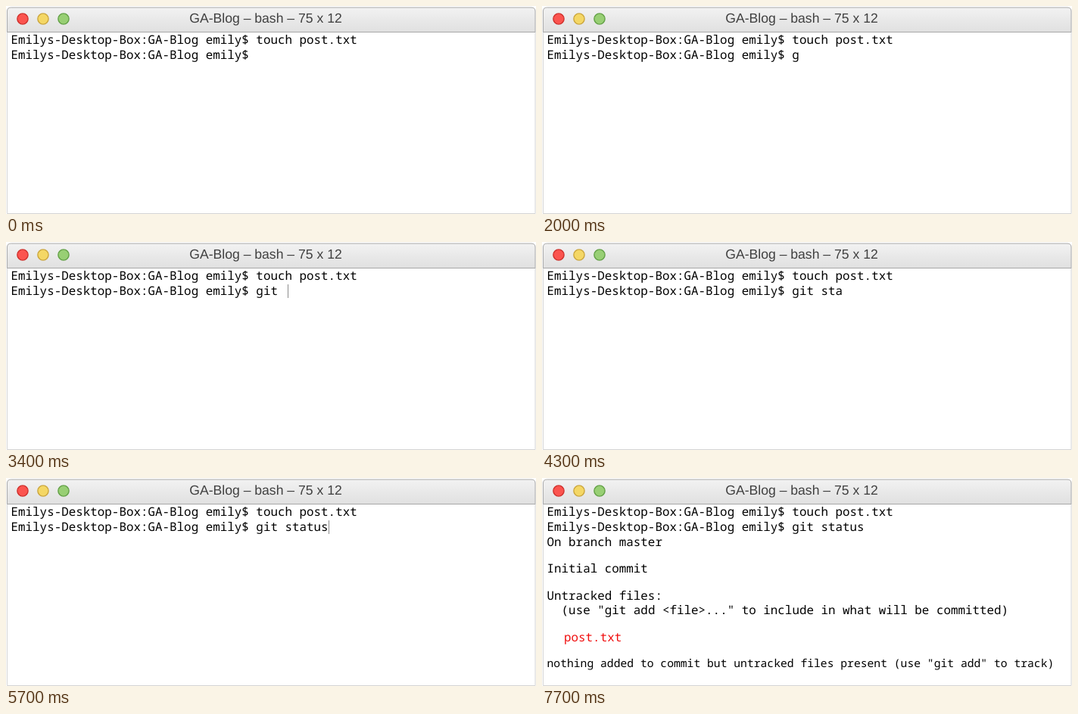
Write an HTML page that moves like this. It is 700 px wide and 275 px high and loops after 8 s.

```html
<!DOCTYPE html>
<html lang="en">
<head>
<meta charset="utf-8">
<title>Terminal</title>
<style>
  html, body { margin: 0; width: 100%; height: 100%; overflow: hidden; background: #fff; }
  svg { display: block; }
  text { white-space: pre; text-rendering: geometricPrecision; }
  .title { font: 17.6px "Liberation Sans", Arial, sans-serif; fill: #404040; text-anchor: middle; }
  .term { font: 15.88px "Noto Sans Mono", monospace; fill: #000; }
  .term .small { font-size: 14.7px; }
  .term .red { fill: #f00f0f; }

  .cover, .cursor, .output { animation: 8s step-end infinite; }
  .cover { animation-name: type; --ch: 9.528px; }
  .cursor { animation-name: blink; }
  .output { animation-name: show; }

  /* the cover slides right one character per key press */
  @keyframes type {
    0% { transform: none; }
    25% { transform: translateX(var(--ch)); }
    27.5% { transform: translateX(calc(2 * var(--ch))); }
    30% { transform: translateX(calc(3 * var(--ch))); }
    48.75% { transform: translateX(calc(5 * var(--ch))); }
    51.25% { transform: translateX(calc(6 * var(--ch))); }
    53.75% { transform: translateX(calc(7 * var(--ch))); }
    56.25% { transform: translateX(calc(8 * var(--ch))); }
    58.75% { transform: translateX(calc(9 * var(--ch))); }
    65%, 100% { transform: translateX(calc(10 * var(--ch))); }
  }
  @keyframes blink {
    0%, 12.5% { opacity: 0; transform: translateX(331px); }
    6.25%, 18.75% { opacity: 1; transform: translateX(331px); }
    25% { opacity: 0; transform: translateX(331px); }
    36.25% { opacity: 1; transform: translateX(358.5px); }
    42.5% { opacity: 1; transform: translateX(371.5px); }
    48.75% { opacity: 0; transform: translateX(371.5px); }
    71.25%, 83.75% { opacity: 1; transform: translateX(425.5px); }
    77.5%, 90%, 100% { opacity: 0; transform: translateX(425.5px); }
  }
  @keyframes show {
    0% { visibility: hidden; }
    96.25%, 100% { visibility: visible; }
  }
</style>
</head>
<body>
<svg width="700" height="275" viewBox="0 0 700 275">
  <defs>
    <linearGradient id="bar" x2="0" y2="1">
      <stop offset="0" stop-color="#f2f2f2"/>
      <stop offset="1" stop-color="#e0e0e0"/>
    </linearGradient>
  </defs>

  <path d="M1.5 34V274.5H699V34" fill="#fff" stroke="#d4d4d4"/>
  <path d="M1.5 34.5V7Q1.5 2 6.5 2H694Q699 2 699 7V34.5Z" fill="url(#bar)" stroke="#a8a8a8"/>
  <g stroke-width="1.4">
    <circle cx="22" cy="17" r="7.1" fill="#fb544f" stroke="#cf2f2b"/>
    <circle cx="49" cy="17" r="7.1" fill="#f4d765" stroke="#cba63c"/>
    <circle cx="76" cy="17" r="7.1" fill="#98cf74" stroke="#62a045"/>
  </g>
  <text class="title" x="343" y="21.8">GA-Blog – bash – 75 x 12</text>

  <g class="term">
    <text x="6.5" y="50">Emilys-Desktop-Box:GA-Blog emily$ touch post.txt</text>
    <text x="6.5" y="70">Emilys-Desktop-Box:GA-Blog emily$ git status</text>
    <rect class="cover" x="330.4" y="55" width="110" height="21" fill="#fff"/>
    <rect class="cursor" y="56" width="1" height="18" fill="#8c8c8c"/>
    <g class="output">
      <text x="6.5" y="90">On branch master</text>
      <text x="6.5" y="125">Initial commit</text>
      <text x="6.5" y="161">Untracked files:</text>
      <text x="25.6" y="180">(use "git add &lt;file>..." to include in what will be committed)</text>
      <text class="red" x="29" y="216">post.txt</text>
      <text class="small" x="6.5" y="250">nothing added to commit but untracked files present (use "git add" to track)</text>
    </g>
  </g>
</svg>
</body>
</html>
```
